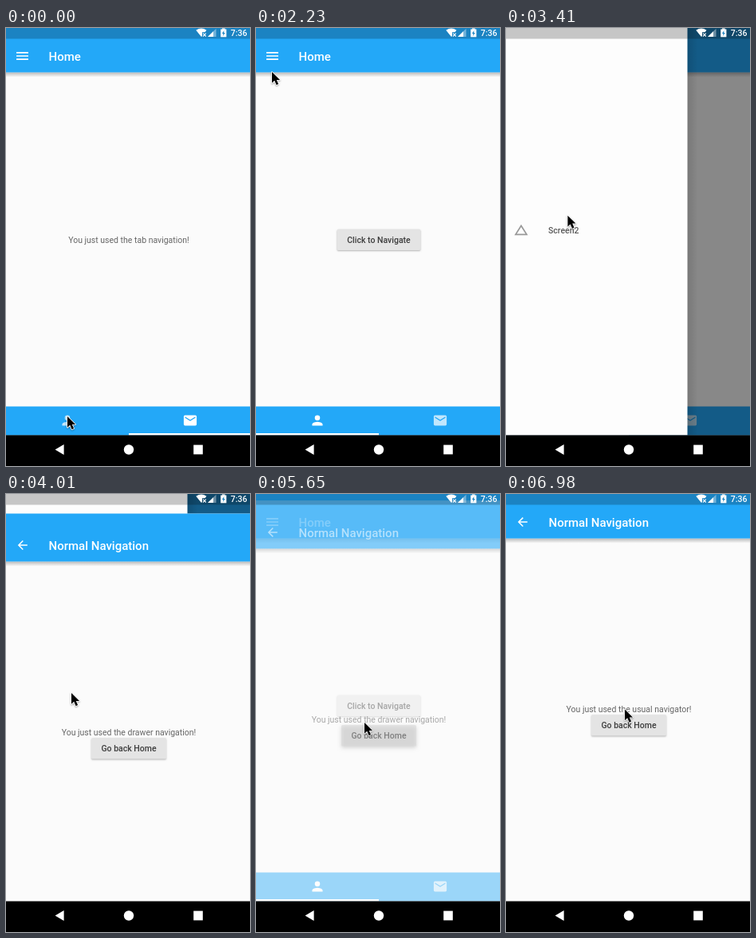
These frames come from a looping animation (306x548 px, 7570 ms). An HTML page with a canvas:

```html
<!DOCTYPE html>
<html lang="en">
<head>
<meta charset="utf-8">
<title>Navigation demo</title>
<style>
  html, body { margin: 0; width: 100%; height: 100%; overflow: hidden; background: #000; }
  canvas { display: block; width: 306px; height: 548px; }
</style>
</head>
<body>
<canvas id="stage"></canvas>
<script>
const W = 306, H = 548, LOOP = 7570, BEATS = 51;
const MID = 154, STATUS_H = 13.5, BAR_END = 55.5, TABS_TOP = 473.5, NAV_TOP = 509.5;
const DRAWER = 227.5, RISE = 29;
const BLUE = '#23a8f8', PAPER = '#fbfbfb', TEXT = '#666', DARK = '#3c3c3c';

const canvas = document.getElementById('stage');
const ctx = canvas.getContext('2d');
const dpr = window.devicePixelRatio || 1;
canvas.width = W * dpr;
canvas.height = H * dpr;

const icons = {
  menu: 'M3 18h18v-2H3zM3 13h18v-2H3zM3 6v2h18V6z',
  back: 'M20 11H7.83l5.59-5.59L12 4l-8 8 8 8 1.41-1.41L7.83 13H20z',
  person: 'M12 12a4 4 0 1 0 0-8 4 4 0 0 0 0 8zM12 14c-2.7 0-8 1.3-8 4v2h16v-2c0-2.7-5.3-4-8-4z',
  mail: 'M20 4H4a2 2 0 0 0-2 2v12a2 2 0 0 0 2 2h16a2 2 0 0 0 2-2V6a2 2 0 0 0-2-2zm0 4l-8 5-8-5V6l8 5 8-5z',
  triangle: 'M12 7.77L18.39 18H5.61L12 7.77M12 4L2 20h20z',
  cursor: 'M0 0V14.6L3.4 11.4 5.9 17 8.5 15.9 6.1 10.5H10.6Z'
};
for (const key in icons) icons[key] = new Path2D(icons[key]);

// Motion: all times are in beats, the animation advances one beat at a time.
const mix = (a, b, p) => a + (b - a) * p;
const smooth = p => p * p * (3 - 2 * p);
const easeOut = p => 1 - (1 - p) ** 3;
const progress = (beat, from, to) => Math.min(1, Math.max(0, (beat - from) / (to - from)));

function cursorAt(beat) {
  const first = progress(beat, 10, 15);
  let x = mix(77, 20, smooth(first)) - 16 * Math.sin(Math.PI * first);
  let y = mix(486, 55, smooth(first));
  const move = (from, to, endX, endY) => {
    const p = smooth(progress(beat, from, to));
    x = mix(x, endX, p);
    y = mix(y, endY, p);
  };
  move(18, 24, 82, 249);
  move(30, 33, 136, 286);
  move(40, 43, 149, 269.5);
  return [x, y];
}

const pageAt = beat => 1 - smooth(progress(beat, 5, 8.8));
const markAt = beat => 1 - smooth(progress(beat, 5, 8));
const drawerAt = beat => beat < 29 ? DRAWER * easeOut(progress(beat, 17, 18.87)) : 0;

function screenAt(beat) {
  const enter = start => ({ offset: RISE * (1 - easeOut(progress(beat, start, start + 2))), opacity: 1 });
  if (beat >= 46) return enter(45.3);
  if (beat < 27 || beat >= 39) return null;
  if (beat < 36) return enter(27);
  const p = progress(beat, 36, 39);
  return { offset: RISE * p * p, opacity: 1 - p ** 2, pressed: true };
}

function rect(x, y, w, h, color) {
  ctx.fillStyle = color;
  ctx.fillRect(x, y, w, h);
}

function label(text, x, y, size, color, weight = 400, align = 'center') {
  ctx.font = `${weight} ${size}px Roboto, sans-serif`;
  ctx.textAlign = align;
  ctx.fillStyle = color;
  ctx.fillText(text, x, y);
}

function icon(name, x, y, scale, color) {
  ctx.save();
  ctx.translate(x, y);
  ctx.scale(scale, scale);
  ctx.translate(-12, -12);
  ctx.fillStyle = color;
  ctx.fill(icons[name], 'evenodd');
  ctx.restore();
}

function polygon(color, ...points) {
  ctx.fillStyle = color;
  ctx.beginPath();
  points.forEach(([x, y]) => ctx.lineTo(x, y));
  ctx.fill();
}

function shadow(x0, y0, x1, y1, alpha, ...box) {
  const fade = ctx.createLinearGradient(x0, y0, x1, y1);
  fade.addColorStop(0, `rgba(0,0,0,${alpha})`);
  fade.addColorStop(1, 'rgba(0,0,0,0)');
  rect(...box, fade);
}

function header(title, iconName, iconX, iconY, iconScale) {
  shadow(0, BAR_END, 0, BAR_END + 6, .26, 0, BAR_END, W, 6);
  rect(0, -4.5, W, BAR_END + 4.5, BLUE);
  icon(iconName, iconX, iconY, iconScale, '#fff');
  label(title, 53.5, 41, 15, '#fff', 500, 'left');
}

function button(text, center, top, width, pressed) {
  ctx.save();
  ctx.shadowColor = 'rgba(0,0,0,.28)';
  ctx.shadowBlur = (pressed ? 5 : 2) * dpr;
  ctx.shadowOffsetY = (pressed ? 2 : 1) * dpr;
  ctx.fillStyle = pressed ? '#d8d8d8' : '#e4e4e4';
  ctx.beginPath();
  ctx.roundRect(center - width / 2, top, width, 26.3, 1.5);
  ctx.fill();
  ctx.restore();
  label(text, center, top + 17, 10.5, DARK, 500);
}

function drawHome(beat) {
  const page = pageAt(beat), mark = markAt(beat);
  rect(0, 0, W, NAV_TOP, PAPER);
  button('Click to Navigate', MID - page * W, 251.7, 104.5, false);
  label('You just used the tab navigation!', MID + (1 - page) * W, 268.5, 10.5, TEXT);
  header('Home', 'menu', 20.5, 35, .83);

  rect(0, TABS_TOP, W, NAV_TOP - TABS_TOP, BLUE);
  const tint = active => `rgba(255,255,255,${active ? 1 : .72})`;
  icon('person', 77, 491, .82, tint(mark < .5));
  icon('mail', 231, 491, .81, tint(mark >= .5));
  rect(mark * MID, 507, MID, 2.5, '#fff');
}

function drawDrawer(width) {
  if (!width) return;
  rect(0, 0, W, NAV_TOP, `rgba(0,0,0,${.46 * width / DRAWER})`);
  shadow(width, 0, width + 13, 0, .12, width, 0, 13, NAV_TOP);
  rect(0, 0, width, NAV_TOP, '#fdfdfd');
  const left = width - DRAWER;
  icon('triangle', left + 19, 252.5, .85, '#999');
  label('Screen2', left + 53, 257, 10.5, '#5a5a5a', 500, 'left');
}

function drawScreen(beat) {
  const screen = screenAt(beat);
  if (!screen) return;
  const how = beat < 45 ? 'drawer navigation' : 'usual navigator';
  ctx.save();
  ctx.globalAlpha = screen.opacity;
  ctx.translate(0, screen.offset);
  rect(0, -4.5, W, H, PAPER);
  label(`You just used the ${how}!`, MID, 273, 10.5, TEXT);
  button('Go back Home', MID, 276.2, 94, screen.pressed);
  header('Normal Navigation', 'back', 20.8, 35, .75);
  ctx.restore();
}

function drawStatusBar() {
  rect(0, 0, W, STATUS_H, 'rgba(0,0,0,.22)');
  // wifi fan with a small cross
  ctx.fillStyle = '#fff';
  ctx.beginPath();
  ctx.moveTo(245, 11);
  ctx.lineTo(238.3, 2.8);
  ctx.quadraticCurveTo(245, -1.6, 251.5, 2.8);
  ctx.lineTo(249.5, 5.2);
  ctx.lineTo(246, 5.2);
  ctx.lineTo(246, 10);
  ctx.fill();
  ctx.strokeStyle = '#fff';
  ctx.lineWidth = 1.1;
  ctx.beginPath();
  ctx.moveTo(247, 6.7); ctx.lineTo(250.8, 10.5);
  ctx.moveTo(250.8, 6.7); ctx.lineTo(247, 10.5);
  ctx.stroke();
  // signal
  polygon('rgba(255,255,255,.4)', [253, 11], [263.5, .8], [263.5, 11]);
  polygon('#fff', [253, 11], [260, 4.2], [260, 11]);
  // battery
  rect(271, .4, 3.6, 1.4, '#fff');
  rect(269.2, 1.5, 7.2, 9.8, '#fff');
  polygon('#1b83c1', [273.5, 3], [270.9, 7], [272.5, 7], [272, 10], [274.8, 5.9], [273.2, 5.9]);
  label('7:36', 302.5, 10, 10.5, '#fff', 500, 'right');
}

function drawNavBar() {
  const y = 527.5;
  rect(0, NAV_TOP, W, H - NAV_TOP, '#000');
  polygon('#fff', [61.6, y], [72.6, y - 6.4], [72.6, y + 6.4]);
  ctx.beginPath();
  ctx.arc(MID, y, 6.2, 0, Math.PI * 2);
  ctx.fill();
  rect(235.2, y - 5.9, 11.6, 11.8, '#fff');
}

function drawCursor(beat) {
  ctx.save();
  ctx.translate(...cursorAt(beat));
  ctx.scale(.95, .95);
  ctx.lineJoin = 'round';
  ctx.lineWidth = 1.7;
  ctx.strokeStyle = '#fff';
  ctx.shadowColor = 'rgba(0,0,0,.35)';
  ctx.shadowBlur = 2 * dpr;
  ctx.shadowOffsetY = dpr;
  ctx.stroke(icons.cursor);
  ctx.shadowColor = 'transparent';
  ctx.fillStyle = '#000';
  ctx.fill(icons.cursor);
  ctx.restore();
}

function draw(now) {
  const beat = Math.floor((now % LOOP) / LOOP * BEATS + .03);
  ctx.setTransform(dpr, 0, 0, dpr, 0, 0);
  drawHome(beat);
  drawDrawer(drawerAt(beat));
  drawScreen(beat);
  drawStatusBar();
  drawNavBar();
  drawCursor(beat);
}

const start = performance.now();
function tick() {
  draw(performance.now() - start);
  requestAnimationFrame(tick);
}
tick();
</script>
</body>
</html>
```
